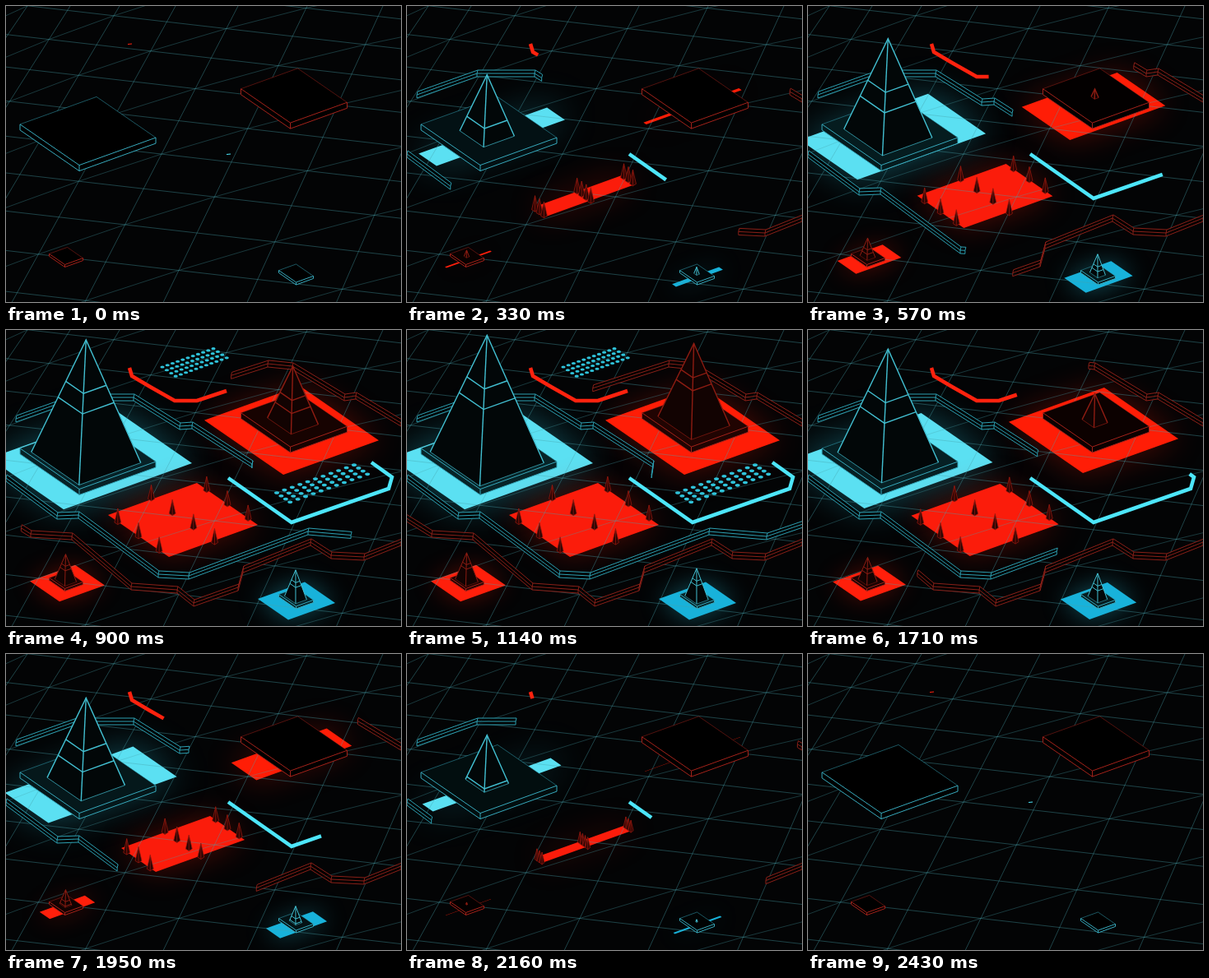
These frames come from a looping animation (480 by 360 pixels, 2.46 s). An HTML page with a canvas:

```html
<!DOCTYPE html>
<html lang="en">
<head>
<meta charset="utf-8">
<title>Neon terrain</title>
<style>
html, body { margin: 0; width: 100%; height: 100%; overflow: hidden; background: #000; }
canvas { display: block; }
</style>
</head>
<body>
<canvas id="stage" width="480" height="360"></canvas>
<script>
const ctx = document.getElementById('stage').getContext('2d');
const STEP = 30, STEPS = 82;
const RISE = -.36, FALL = .69;   // slopes of the two ground axes

const cyan = { edge: '#37a9bc', line: '#42bfd1', rail: '#2c9fb1', face: '#020708', tint: 'rgba(25,120,135,', glow: 'rgba(40,190,215,.4)' };
const red = { edge: '#a3221a', line: '#8d1c12', rail: '#8a2018', face: '#120302', tint: 'rgba(110,14,8,', glow: 'rgba(255,25,8,.3)' };

const clamp = x => Math.max(0, Math.min(1, x));
const mix = (a, b, t) => [a[0] + (b[0] - a[0]) * t, a[1] + (b[1] - a[1]) * t];
const shift = (p, dx, dy) => [p[0] + dx, p[1] + dy];
const span = (k, from, to) => clamp((k - from) / (to - from));
const quadInOut = x => x < .5 ? 2 * x * x : 1 - 2 * (1 - x) ** 2;
const smooth = x => x * x * (3 - 2 * x);
const cubicOut = x => 1 - (1 - x) ** 3;
const range = (from, to) => Array.from({ length: to - from + 1 }, (_, i) => from + i);

function trace(points, closed) {
  ctx.beginPath();
  points.forEach(p => ctx.lineTo(p[0], p[1]));
  if (closed) ctx.closePath();
}

function stroke(points, color, width = 1, closed = false) {
  trace(points, closed);
  ctx.strokeStyle = color;
  ctx.lineWidth = width;
  ctx.stroke();
}

function fill(points, color) {
  trace(points, true);
  ctx.fillStyle = color;
  ctx.fill();
}

const distance = (a, b) => Math.hypot(b[0] - a[0], b[1] - a[1]);
const lengthOf = path => path.slice(1).reduce((sum, p, i) => sum + distance(path[i], p), 0);

// First part of a polyline, up to the given length.
function trim(path, length) {
  const out = [path[0]];
  for (let i = 1; i < path.length && length > 0; i++) {
    const d = distance(path[i - 1], path[i]);
    out.push(mix(path[i - 1], path[i], Math.min(1, length / d)));
    length -= d;
  }
  return out;
}

// Ground position from a centre and steps along the two axes.
const ground = (at, along, across) =>
  [at[0] + along + across, at[1] + along * RISE + across * FALL];

// Corners in the order left, front, right, back.
const plate = (at, along, across) => [
  ground(at, -along, -across), ground(at, -along, across),
  ground(at, along, across), ground(at, along, -across)
];

function crossing(i, j) {
  const slope = .115;
  const row = 203 + 45.5 * i + .85 * i * i;
  const top = 282 + 80 * j + 4 * j * j;
  const lean = (96 + 92 * j + 3.3 * j * j - top) / 360;
  const y = (row + slope * top) / (1 - slope * lean);
  return [top + lean * y, y];
}

function drawGrid() {
  const color = 'rgba(72,160,170,.4)';
  range(-9, 4).forEach(i => stroke([crossing(i, -6), crossing(i, 5)], color));
  range(-6, 5).forEach(j => stroke([crossing(-9, j), crossing(5, j)], color));
  for (let sum = -13; sum <= 9; sum += 2)
    stroke(range(-6, 5).map(j => crossing(sum - j, j)), 'rgba(72,160,170,.33)');
}

const field = { at: [215, 231], along: 54, across: 37, color: '#fb1c0b', hue: red, start: 3 };
const sheets = [
  { at: [103, 159], along: 78, across: 45, color: '#5be0f2', hue: cyan, start: 2.3 },
  { at: [347, 122], along: 58, across: 48, color: '#ff1d06', hue: red, start: 8.5 },
  field,
  { at: [74.5, 308], along: 27.5, across: 18, color: '#ff1f0b', hue: red, start: 8 },
  { at: [353, 329.5], along: 28.5, across: 18.5, color: '#18b2da', hue: cyan, start: 5.5 }
];
const opening = (k, start) => quadInOut(span(k, start, 27.3));

function drawSheet({ at, along, across, color, hue, start }, k) {
  const open = opening(k, start);
  if (!open) return;
  ctx.save();
  ctx.shadowColor = hue.glow;
  ctx.shadowBlur = 20 + along * .35;
  fill(plate(at, along, across * open), color);
  ctx.restore();
}

const rising = from => k => cubicOut(span(k, from, 44));
const towers = [
  { at: [99.5, 152], along: 46.5, across: 36, hue: cyan, height: 149, foot: .84, grow: rising(3) },
  { at: [350, 109], along: 34.5, across: 30, hue: red, height: 95, foot: .68, grow: k => smooth(span(k, 14, 39)) },
  { at: [73, 304], along: 11, across: 9.5, hue: red, height: 34, foot: .68, grow: rising(8) },
  { at: [352.5, 325], along: 10.5, across: 10.5, hue: cyan, height: 36, foot: .68, grow: rising(8) }
];

// The pyramid emerges from its slab, so its bands keep their distance to the apex.
function drawPyramid({ at, along, across, hue, height, foot }, size) {
  const center = shift(at, -.015 * height, .02 * height);
  const apex = shift(center, 0, -height * size);
  const [l, f, r] = plate(center, along * foot * size, across * foot * size);
  const width = height > 50 ? 1.4 : 1;
  fill([apex, l, f, r], hue.face);
  stroke([l, f, r], hue.line, width / 2);
  stroke([l, apex, r], hue.line, width);
  stroke([apex, f], hue.line, width);
  for (const drop of [.355, .49])
    if (drop < size)
      stroke([l, f, r].map(p => mix(apex, p, drop / size)), hue.line, width);
}

function drawTower(tower, k) {
  const { at, along, across, hue, grow } = tower;
  const [l, f, r, b] = plate(at, along, across);
  const thick = along > 20 ? 7 : 3;
  const [dl, df, dr] = [l, f, r].map(p => shift(p, 0, thick));
  const outline = [l, dl, df, dr, r, b];
  fill(outline, '#000');
  fill(outline, hue.tint + .3 * grow(k) + ')');
  stroke([l, b, r], hue.edge, .5);
  stroke([l, f, r], hue.edge);
  stroke([l, dl, df, dr, r], hue.edge);
  stroke([f, df], hue.edge);
  if (grow(k) > .03) drawPyramid(tower, grow(k));
}

const sliding = (from, to) => k => smooth(span(k, from, to));
const backRails = [
  { hue: cyan, grow: rising(3),
    path: [[12, 108], [85, 82], [155, 82], [211, 117], [226, 116], [299, 163], [297, 177]] },
  { hue: red, grow: sliding(6, 39),
    path: [[480, 113], [425, 80], [411, 82], [348, 44], [318, 41], [225, 71]] }
];
const frontRails = [
  { hue: red, grow: sliding(3, 38),
    path: [[480, 258], [435, 276], [395, 274], [370, 258], [288, 291], [282, 313], [228, 332],
           [208, 316], [152, 312], [80, 251], [30, 248], [-50, 198]] },
  { hue: cyan, grow: sliding(3.5, 38),
    path: [[0, 180], [62, 226], [88, 225], [185, 297], [222, 299], [367, 245], [437, 251], [490, 233]] }
];

function drawRail({ path, hue, grow }, k) {
  const reach = lengthOf(path) * grow(k);
  if (reach < 1) return;
  const mid = trim(path, reach);
  const top = mid.map(p => shift(p, 1, -4));
  const low = mid.map(p => shift(p, 0, 4));
  fill([...top, ...low.slice().reverse()], 'rgba(0,0,0,.75)');
  [top, mid, low].forEach(edge => stroke(edge, hue.rail));
  mid.forEach((p, i) => stroke([top[i], p, low[i]], hue.rail));
}

const ribbons = [
  { path: [[150, 46], [153, 56], [175, 69], [205, 86], [232, 86], [268, 74]], color: '#ff220e', start: 4.5 },
  { path: [[270, 180], [347, 234], [465, 193], [469, 179], [444, 161]], color: '#4de6fa', start: 2 }
];

function drawRibbon({ path, color, start }, k) {
  const reach = lengthOf(path) * quadInOut(span(k, start, 30));
  const [x, y] = path[0];
  if (reach < 3) stroke([[x - 2, y + .5], [x + 3, y]], color, 1.2);
  else stroke(trim(path, reach), color, 4.5);
}

const dotFields = [
  { origin: [190, 45], gap: 6.2, radius: 2.6 },
  { origin: [329, 198], gap: 9.4, radius: 3 }
];

function drawDots({ origin, gap, radius }, k) {
  ctx.fillStyle = '#2fc3da';
  for (let i = 0; i < 11; i++) {
    const size = radius * span(k, 24 + i * .35, 26.5 + i * .35);
    if (!size) continue;
    for (let j = 0; j < 4; j++) {
      const [x, y] = ground(origin, gap * i, 5.4 * j);
      ctx.beginPath();
      ctx.ellipse(x, y, size, size * .6, 0, 0, 7);
      ctx.fill();
    }
  }
}

function drawSpike(foot, size) {
  const apex = shift(foot, 0, -18 * size);
  const sides = [shift(foot, -4 * size, -1), shift(foot, 0, 1.5), shift(foot, 4 * size, -1)];
  fill([apex, ...sides], '#2c0503');
  stroke([apex, ...sides], '#9c1a10', .7, true);
  stroke([apex, sides[1]], '#9c1a10', .7);
}

// Three ranks across the field: three, four and three spikes.
function drawSpikes(k) {
  const size = span(k, 3, 11);
  if (!size) return;
  for (const rank of [1, 0, -1]) {
    const count = rank ? 3 : 4;
    const reach = field.across * (rank ? .68 : 1.04) * opening(k, field.start);
    for (let i = 0; i < count; i++)
      drawSpike(shift(ground(field.at, field.along * rank, reach * (2 * i / (count - 1) - 1)), 0, 2), size);
  }
}

function render(now) {
  const step = Math.floor(now / STEP) % STEPS;
  const k = Math.min(step, STEPS - 1 - step);
  ctx.fillStyle = '#030405';
  ctx.fillRect(0, 0, 480, 360);
  sheets.forEach(s => drawSheet(s, k));
  drawGrid();
  backRails.forEach(r => drawRail(r, k));
  dotFields.forEach(d => drawDots(d, k));
  towers.forEach(t => drawTower(t, k));
  drawSpikes(k);
  frontRails.forEach(r => drawRail(r, k));
  ribbons.forEach(r => drawRibbon(r, k));
}

function tick() {
  render(performance.now());
  requestAnimationFrame(tick);
}
tick();
</script>
</body>
</html>
```
